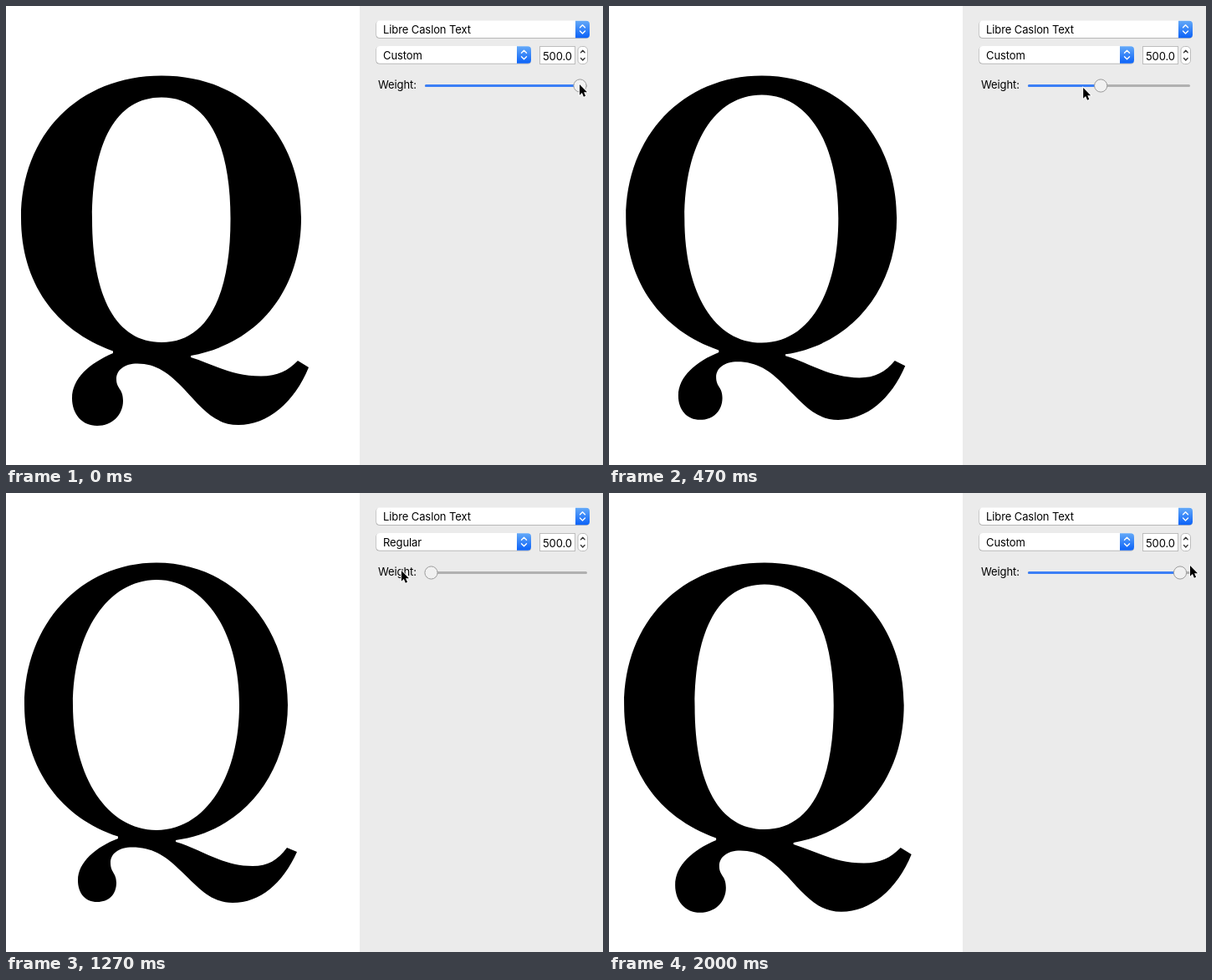
These frames come from a looping animation (714 by 550 pixels, 2070 ms). An HTML page:

```html
<!DOCTYPE html>
<html lang="en">
<head>
<meta charset="utf-8">
<title>Variable weight slider</title>
<style>
html, body { margin: 0; width: 100%; height: 100%; overflow: hidden; background: #fff; }
svg { display: block; }
text { font: 13px Inter, "Noto Sans", sans-serif; letter-spacing: -.1px; }
.chevron { fill: none; stroke-linecap: round; stroke-linejoin: round; }
</style>
</head>
<body>
<svg width="714" height="550" viewBox="0 0 714 550">
  <defs>
    <linearGradient id="blue" x2="0" y2="1">
      <stop stop-color="#64a9f8"/><stop offset="1" stop-color="#0b62f8"/>
    </linearGradient>
    <g id="arrows">
      <path d="M0 0h13a4 4 0 0 1 4 4v12.5a4 4 0 0 1-4 4H0z" fill="url(#blue)"/>
      <path class="chevron" d="M5.5 8l3-3 3 3M5.5 12.4l3 3 3-3" stroke="#fff" stroke-width="1.4"/>
    </g>
  </defs>
  <path id="glyph" fill-rule="evenodd"/>
  <path d="M423 0h291v550H423z" fill="#ebebeb"/>

  <rect x="442.5" y="18" width="255.5" height="20.8" rx="4" fill="#a8a8a8"/>
  <rect x="443" y="17.5" width="255" height="20.5" rx="4" fill="#fff"/>
  <use href="#arrows" x="681" y="17.7"/>
  <text x="451" y="33">Libre Caslon Text</text>

  <rect x="442.5" y="48.5" width="185.5" height="21" rx="4" fill="#a8a8a8"/>
  <rect x="443" y="48" width="185" height="20.8" rx="4" fill="#fff"/>
  <use href="#arrows" x="611" y="48.3"/>
  <text id="style" x="451" y="64"></text>

  <rect x="638.5" y="48.5" width="42" height="21" fill="#fff" stroke="#bdbdbd"/>
  <text x="642" y="65">500.0</text>
  <rect x="684" y="48.5" width="11.5" height="21" rx="4.5" fill="#fff" stroke="#bdbdbd"/>
  <path class="chevron" d="M687.5 55.7l2.3-2.5 2.3 2.5M687.5 62.5l2.3 2.5 2.3-2.5" stroke="#333" stroke-width="1.3"/>

  <text x="445" y="99">Weight:</text>
  <rect x="501" y="94" width="194" height="3" rx="1.5" fill="#b0b0b0"/>
  <rect id="fill" x="501" y="94" height="3" rx="1.5" fill="#3b7ff6"/>
  <circle id="knob" cy="95.5" r="7.6" fill="#f1f1f1" stroke="#9b9b9b"/>
  <path id="cursor" d="M0 0V12.8L2.9 10.1 4.9 14.7 7.1 13.7 5.1 9.2H9Z" stroke="#fff" stroke-width="1.6" paint-order="stroke"/>
</svg>
<script>
const LOOP = 2070, STEP = 200 / 3, LAG = 60;
const MIN = 508.5, MAX = 686.5;
const $ = id => document.getElementById(id);

// Regular and bold outlines share one structure, so their numbers blend.
const regular = `M134 411.5 C67 390 22 331 22 254 C22 157 90 83.5 180 83.5
  C270 83.5 337 157 337 254 C337 337 282 406 203 416 L203 418
  C232 426 258 447 295 447 C313 447 325 440 336 425 L348 430
  C331 468 304 491 271 491 C243 491 228 470 206 450 C190 434 174 424.5 151 424.5
  C135 424.5 125 432 125 443 C125 455 132 455 132 467 C132 481 123 490 109 490
  C95 490 86 480 86 464 C86 442 108 424 134 414 Z
  M180 104 C122 104 80 167 80 254 C80 341 122 404 180 404
  C238 404 279 341 279 254 C279 167 238 104 180 104 Z`;
const bold = `M128 413.5 C58 388 18 331 18 254 C18 154 87 83.5 186 83.5
  C285 83.5 353 154 353 254 C353 340 303 404 221 419 L221 421
  C250 430 270 443.5 305 443.5 C325 443.5 337 437 349 425 L362 433
  C345 475 313 502 278 502 C250 502 235 483 213 459 C195 440 180 428.5 157 428.5
  C142 428.5 132 436 132 447 C132 459 140 458 140 473 C140 490 127 503 109 503
  C91 503 79 489 79 470 C79 446 100 428 128 416 Z
  M186 109.5 C132 109.5 103 163 103 255 C103 349 132 403 186 403
  C240 403 268.5 349 268.5 255 C268.5 163 240 109.5 186 109.5 Z`;
const number = /[\d.]+/g, heavy = bold.match(number);
const outline = w => {
  let i = 0;
  return regular.replace(number, a => +a + (heavy[i++] - a) * w);
};

// Pointer path: time, x, y
const path = [
  [0, 686, 94], [130, 672, 95], [270, 633, 97], [330, 615, 97], [470, 566, 98],
  [540, 539, 98], [600, 536, 98], [930, 500, 98], [1070, 471, 93], [1200, 471, 93],
  [1270, 473, 93], [1400, 530, 96], [1540, 584, 98], [1600, 595, 98],
  [1730, 622, 97], [1940, 683, 89], [2000, 695, 87], [2070, 686, 94]
];
function pointer(t) {
  t = (t + LOOP) % LOOP;
  const i = path.findIndex(p => p[0] > t), a = path[i - 1], b = path[i];
  const k = (t - a[0]) / (b[0] - a[0]);
  return [a[1] + (b[1] - a[1]) * k, a[2] + (b[2] - a[2]) * k];
}

function draw(now) {
  const t = Math.floor((now % LOOP + 4) / STEP) * STEP % LOOP;
  const [x, y] = pointer(t);
  const knob = Math.min(MAX, Math.max(MIN, pointer(t - LAG)[0]));
  const weight = (knob - MIN) / (MAX - MIN);
  $("glyph").setAttribute("d", outline(weight));
  $("style").textContent = weight ? "Custom" : "Regular";
  $("fill").setAttribute("width", weight ? knob - 501 : 0);
  $("knob").setAttribute("cx", knob);
  $("cursor").setAttribute("transform", `translate(${x} ${y})`);
}

const start = performance.now();
function tick() {
  draw(performance.now() - start);
  requestAnimationFrame(tick);
}
tick();
</script>
</body>
</html>
```
